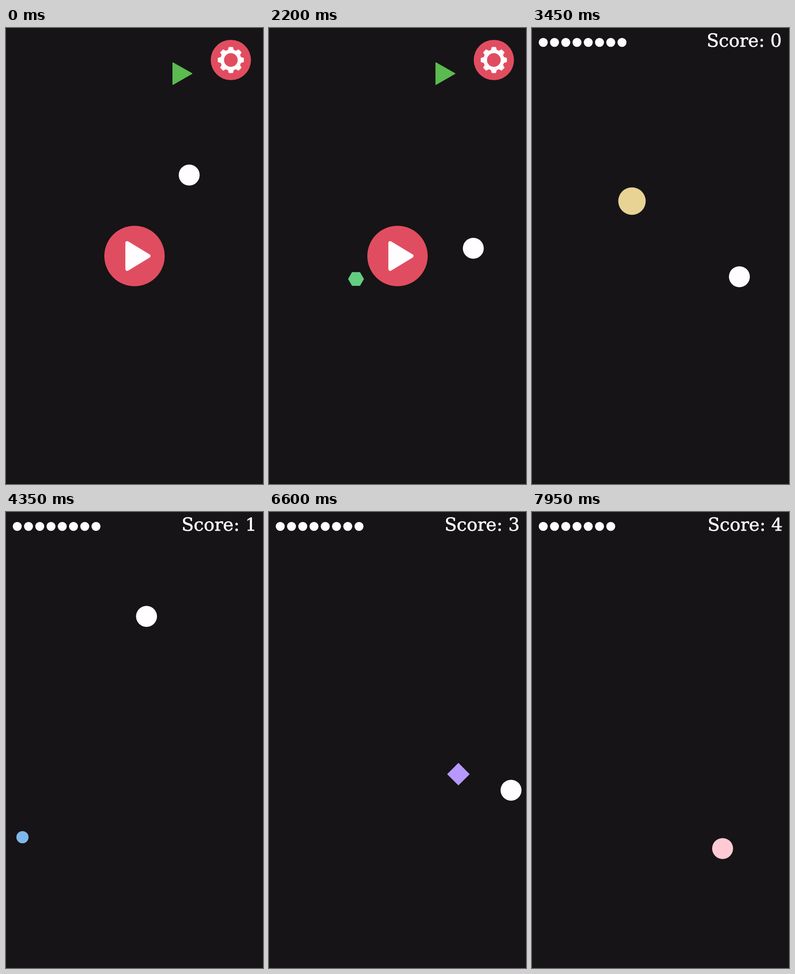
An HTML page with a canvas that plays this animation: 562x997 px, repeating every 8 s.

```html
<!DOCTYPE html>
<html lang="en">
<head>
<meta charset="utf-8">
<title>Bouncing ball game</title>
<style>
html, body { margin: 0; width: 100%; height: 100%; overflow: hidden; background: #161416; }
canvas { display: block; width: 100%; height: 100%; }
</style>
</head>
<body>
<canvas id="stage" width="562" height="997"></canvas>
<script>
const ctx = document.getElementById('stage').getContext('2d');
const W = 562, H = 997, LOOP = 8000, STEP = 50;
const BG = '#161416', RED = '#e14d60', WHITE = '#fffdff', PINK = '#ffcad3';
const BALL = 22.9, INSET = 23.85, GAME_START = 2250, MISS = 7500;

// Each shape grows from its birth until it reaches max or is gone.
const menuShapes = [
  { sides: 6, x: 190.3, y: 548.7, color: '#64cd82', born: 200, gone: GAME_START, rate: 0.08, max: 17.4 },
  { sides: 0, x: 293.3, y: 422, color: '#d06ad4', born: 950, gone: 1850, rate: 0.08, max: 15.2 }
];
const gameShapes = [
  { sides: 0, x: 218.6, y: 378.5, color: '#e8d395', born: 2300, gone: 3750, rate: 0.0261 },
  { sides: 0, x: 36, y: 711, color: '#7fb8e8', born: 3800, gone: 4600, rate: 0.0242 },
  { sides: 3, x: 432.9, y: 56.5, color: '#df80d5', born: 4750, gone: 6000, rate: 0.0246 },
  { sides: 4, x: 414.2, y: 573.2, color: '#b798ff', born: 6000, gone: 6900, rate: 0.0411 },
  { sides: 0, x: 205, y: 947, color: '#64cd82', born: 6950, gone: MISS, rate: 0.031 }
];
const scoreTimes = [3750, 4600, 6000, 6900];

function circle(x, y, r, color) {
  ctx.fillStyle = color;
  ctx.beginPath();
  ctx.arc(x, y, r, 0, Math.PI * 2);
  ctx.fill();
}

function polygon(points, color, round = 0) {
  ctx.beginPath();
  points.forEach(([x, y]) => ctx.lineTo(x, y));
  ctx.closePath();
  ctx.fillStyle = color;
  ctx.fill();
  if (round) {
    ctx.lineJoin = 'round';
    ctx.lineWidth = round;
    ctx.strokeStyle = color;
    ctx.stroke();
  }
}

function ring(x, y, r, sides) {
  return Array.from({ length: sides }, (_, i) => {
    const a = i * 2 * Math.PI / sides;
    return [x + r * Math.cos(a), y + r * Math.sin(a)];
  });
}

function drawShape(s, t) {
  if (t < s.born || t >= s.gone) return;
  const r = Math.min(s.max || Infinity, (t - s.born) * s.rate);
  if (s.sides) polygon(ring(s.x, s.y, r, s.sides), s.color);
  else circle(s.x, s.y, r, s.color);
}

// Reflects a straight run between the two walls of an axis.
function fold(v, size) {
  const span = size - 2 * INSET;
  const p = (((v - INSET) % (2 * span)) + 2 * span) % (2 * span);
  return INSET + (p > span ? 2 * span - p : p);
}

function ballAt(t) {
  const k = t / STEP;
  if (t < 1850) return [fold(400.6 - 17.835 * k, W), fold(321.5 - 17.835 * k, H)];
  if (t < GAME_START) return [307.1 + 19.95 * (k - 37), 386.1 + 13.65 * (k - 37)];
  if (t < MISS) {
    const d = 17.53 * (k - 69);
    return [fold(453.5 + d, W), fold(543.8 - d, H)];
  }
  return [295 + 20.3 * (k - 153), 857 - 20.2 * (k - 153)];
}

function drawGear(x, y) {
  circle(x, y, 44, RED);
  circle(x, y, 23, WHITE);
  ctx.save();
  ctx.translate(x, y);
  for (let i = 0; i < 8; i++) {
    polygon([[-6.5, -20], [-4.2, -28], [4.2, -28], [6.5, -20]], WHITE, 1);
    ctx.rotate(Math.PI / 4);
  }
  ctx.restore();
  circle(x, y, 15, RED);
}

function drawMenu(t) {
  polygon([[365, 76], [406.5, 99.7], [365, 123.5]], '#5bba50', 2);
  menuShapes.forEach(s => drawShape(s, t));
  circle(...ballAt(t), BALL, WHITE);
  circle(281, 498.5, 66, RED);
  polygon([[265, 470], [312, 498.5], [265, 527]], WHITE, 8);
  drawGear(491.7, 70);
}

function drawGame(t) {
  const lives = t < MISS ? 8 : 7;
  for (let i = 0; i < lives; i++) circle(24.6 + 24.6 * i, 31.5, 9.8, WHITE);

  const score = scoreTimes.filter(s => t >= s).length;
  const label = 'Score: ' + score;
  const right = score ? 548 : 546;
  ctx.font = '39px "DejaVu Serif", serif';
  ctx.textAlign = 'right';
  ctx.fillStyle = ctx.strokeStyle = WHITE;
  ctx.lineWidth = 0.7;
  ctx.fillText(label, right, 41);
  ctx.strokeText(label, right, 41);

  gameShapes.forEach(s => drawShape(s, t));
  circle(...ballAt(t), BALL, t < MISS ? WHITE : PINK);
}

function render(now) {
  const t = Math.floor((now % LOOP) / STEP) * STEP;
  ctx.fillStyle = BG;
  ctx.fillRect(0, 0, W, H);
  (t < GAME_START ? drawMenu : drawGame)(t);
}

let start;
function tick(now) {
  if (start === undefined) start = now;
  render(Math.max(0, now - start));
  requestAnimationFrame(tick);
}
render(0);
requestAnimationFrame(tick);
</script>
</body>
</html>
```
